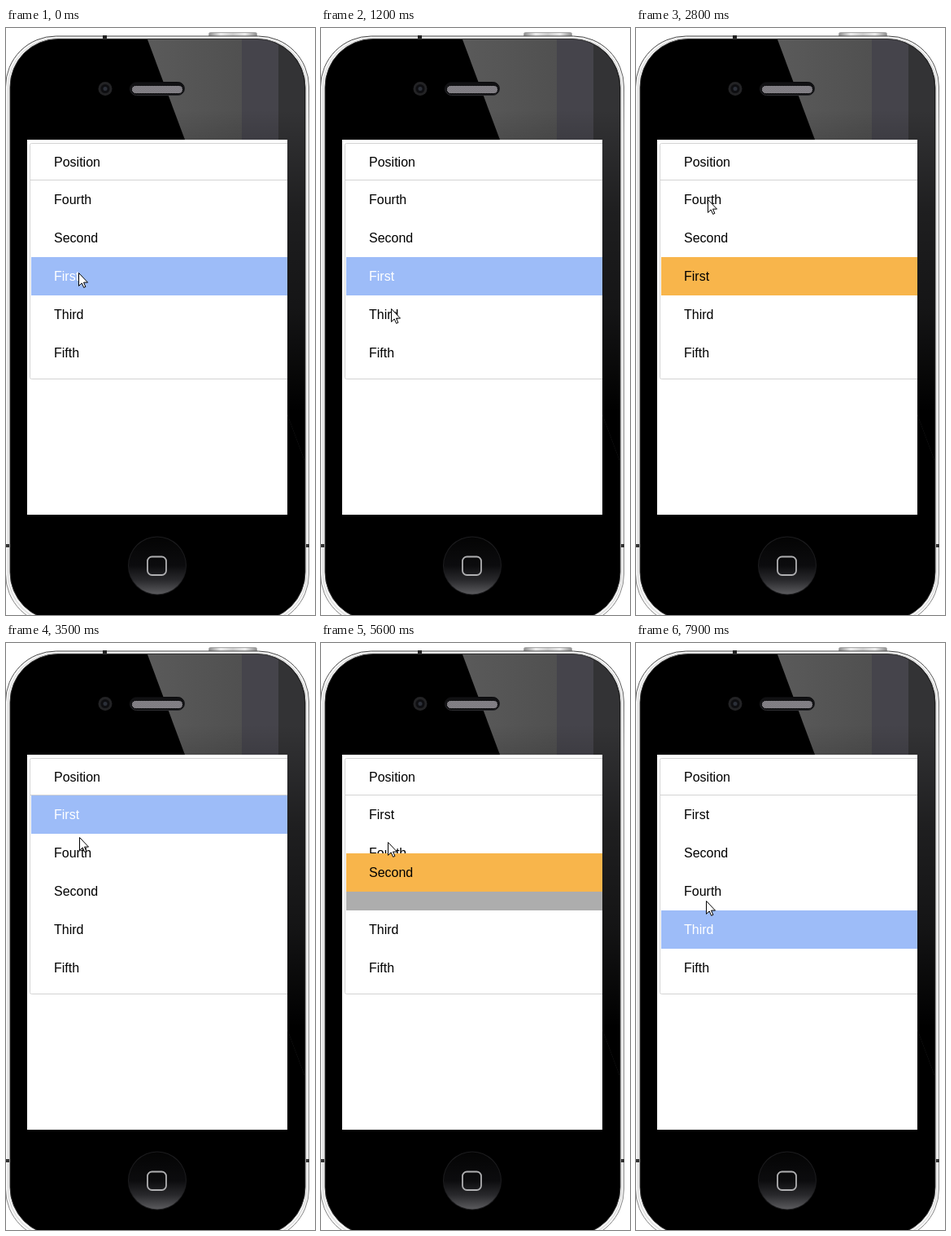
Recreate the animation shown at these times as an HTML page with a canvas. Size 380 by 720 pixels, loop 8 s.

```html
<!DOCTYPE html>
<html lang="en">
<head>
<meta charset="utf-8">
<title>Sortable list on a phone</title>
<style>
html, body { margin: 0; width: 100%; height: 100%; overflow: hidden; background: #fff; }
canvas { display: block; width: 380px; height: 720px; }
</style>
</head>
<body>
<canvas id="stage" width="380" height="720"></canvas>
<script>
const W = 380, H = 720, LOOP = 8000, STEP = 100;
const TOP = 187, ROW = 47, LEFT = 31, RIGHT = 346;
const SCREEN = [26, 137, 320, 460];
const ctx = document.getElementById('stage').getContext('2d', { alpha: false });

const names = ['Fourth', 'Second', 'First', 'Third', 'Fifth'];

// Turning points of the pointer: step, x, y
const path = [
  [1, 89, 300], [6, 88, 206], [12, 86, 344], [14, 86, 412], [16, 88, 225],
  [17.4, 89, 314], [24, 89, 314], [28, 88, 210], [34, 89, 222], [40, 95, 315],
  [52, 95, 315], [56, 82, 244], [64, 82, 246], [70, 85, 305], [74, 86, 395],
  [77, 86, 346], [79, 86, 316]
];

// Each drag: item, first and last step, turning points of the row top
const drags = [
  { item: 'First', from: 21, to: 34, keys: [[28, 281], [32, 187]] },
  { item: 'Second', from: 48, to: 61, keys: [[55, 281], [56, 258], [57, 258], [58, 216]] }
];

function at(keys, step) {
  const i = keys.findIndex(k => k[0] >= step);
  if (i <= 0) return keys.at(i).slice(1);
  const a = keys[i - 1], b = keys[i];
  const k = (step - a[0]) / (b[0] - a[0]);
  return a.slice(1).map((v, j) => v + (b[j + 1] - v) * k);
}

// Evenly spaced colours along a line
function blend(c, x0, y0, x1, y1, ...cols) {
  const g = c.createLinearGradient(x0, y0, x1, y1);
  cols.forEach((col, i) => g.addColorStop(i / (cols.length - 1), col));
  return g;
}

function rounded(c, x, y, w, h, r, fill, stroke, line = 1) {
  c.beginPath();
  c.roundRect(x, y, w, h, r);
  if (fill) { c.fillStyle = fill; c.fill(); }
  if (stroke) { c.strokeStyle = stroke; c.lineWidth = line; c.stroke(); }
}

function disc(c, x, y, r, fill) {
  c.beginPath();
  c.arc(x, y, r, 0, Math.PI * 2);
  c.fillStyle = fill;
  c.fill();
}

function rect(c, x, y, w, h, fill) {
  c.fillStyle = fill;
  c.fillRect(x, y, w, h);
}

function label(c, text, y, fill) {
  c.font = '16px "Liberation Sans", Arial, sans-serif';
  c.fillStyle = fill;
  c.fillText(text, 59, y);
}

function drawBody(c) {
  rounded(c, 249.5, 5.5, 59, 7, 2, blend(c, 249, 0, 309, 0, '#888', '#eee', '#ccc', '#eee', '#888'), '#aaa');
  rounded(c, -0.5, 10, 373, 722, 62, '#f6f6f6', blend(c, 0, 10, 0, 130, '#444', '#888'));
  rounded(c, 2.5, 12.5, 367.5, 717, 60, null, '#d4d4d4');
  rounded(c, 5, 13.5, 363, 713, 59, '#000', '#333');
  rect(c, 119, 9, 5, 4, '#222');
  rect(c, 0, 633, 4, 4, '#333');
  rect(c, 369, 633, 4, 4, '#333');
}

function drawGloss(c) {
  c.save();
  c.beginPath();
  c.roundRect(5, 14, 362, 711, 58);
  c.clip();
  c.beginPath();
  c.moveTo(174, 14);
  c.lineTo(W, 14);
  c.lineTo(W, 565);
  c.clip();
  rect(c, 174, 14, 116, H, blend(c, 174, 0, 290, 0, '#5a5a5a', '#505050'));
  rect(c, 290, 14, 45, H, '#45444b');
  rect(c, 335, 14, 45, H, '#333335');
  rect(c, 174, 14, 206, H, blend(c, 0, 100, 0, 470, 'rgba(0,0,0,0)', 'rgba(0,0,0,.4)', 'rgba(0,0,0,.6)', '#000'));
  c.restore();
}

function drawSpeaker(c) {
  rounded(c, 152.5, 66.5, 67, 16, 8, '#111113', blend(c, 0, 66, 0, 83, '#08080a', '#2c2c30'));
  rounded(c, 155, 71, 62, 9, 4.5, '#59575c');
  c.save();
  c.clip();
  for (let y = 71; y < 80; y++)
    for (let x = 155 + y % 2; x < 217; x += 2) rect(c, x, y, 1, 1, '#a8a5ab');
  c.restore();
}

function drawHome(c) {
  disc(c, 186, 659.5, 36, '#1c1c1e');
  disc(c, 186, 659.5, 35, blend(c, 0, 624, 0, 695, '#040404', '#080809', '#0c0c0e', '#29292c', '#5c5c5f'));
  rounded(c, 174, 648.5, 23, 22.5, 5.5, null, '#b0b0b2', 1.8);
}

function drawPage(c) {
  rect(c, ...SCREEN, '#fff');
  c.save();
  c.beginPath();
  c.rect(...SCREEN);
  c.clip();
  rounded(c, 29.5, 141.5, 340, 289, 2, null, '#d3d3d3');
  rect(c, 30, 186, 316, 1, '#d3d3d3');
  c.restore();
  label(c, 'Position', 170, '#000');
}

function drawPhone(c) {
  rect(c, 0, 0, W, H, '#fff');
  drawBody(c);
  drawGloss(c);
  disc(c, 122, 74.5, 8.5, '#232325');
  disc(c, 122, 74.5, 5.5, '#0e0e11');
  disc(c, 122, 74.5, 2.5, '#2b2f38');
  drawSpeaker(c);
  drawHome(c);
  drawPage(c);
}

function drawRow(text, y, back, ink = '#000') {
  if (back) rect(ctx, LEFT, y, RIGHT - LEFT, ROW, back);
  label(ctx, text, y + 29, ink);
}

function drawPointer(x, y) {
  ctx.save();
  ctx.translate(x, y);
  const arrow = new Path2D('M.5 .5V16.4L4.2 12.9L6.7 18.4L8.9 17.4L6.5 12.1H11.5Z');
  ctx.fillStyle = '#fff';
  ctx.fill(arrow);
  ctx.strokeStyle = '#000';
  ctx.lineWidth = 1;
  ctx.stroke(arrow);
  ctx.restore();
}

const phone = document.createElement('canvas');
phone.width = W;
phone.height = H;
drawPhone(phone.getContext('2d'));

function render(ms) {
  const step = Math.floor(ms / STEP);
  const order = names.slice();
  let held = null, heldY = 0;

  for (const d of drags) {
    if (step < d.from) break;
    const y = Math.round(at(d.keys, step)[0]);
    order.splice(order.indexOf(d.item), 1);
    order.splice(Math.round((y - TOP) / ROW), 0, d.item);
    if (step <= d.to) { held = d.item; heldY = y; }
  }

  // The hover highlight trails the pointer by one step
  const hover = Math.floor((at(path, step - 1)[1] - TOP) / ROW);

  ctx.drawImage(phone, 0, 0);
  order.forEach((name, i) => {
    const y = TOP + i * ROW;
    if (name === held) drawRow('', y, '#adadad');
    else if (!held && i === hover) drawRow(name, y, '#9dbcf8', '#fff');
    else drawRow(name, y);
  });
  if (held) drawRow(held, heldY, '#f8b54b');

  drawPointer(...at(path, step).map(Math.round));
}

const start = performance.now();
function tick() {
  render((performance.now() - start) % LOOP);
  requestAnimationFrame(tick);
}
tick();
</script>
</body>
</html>
```
